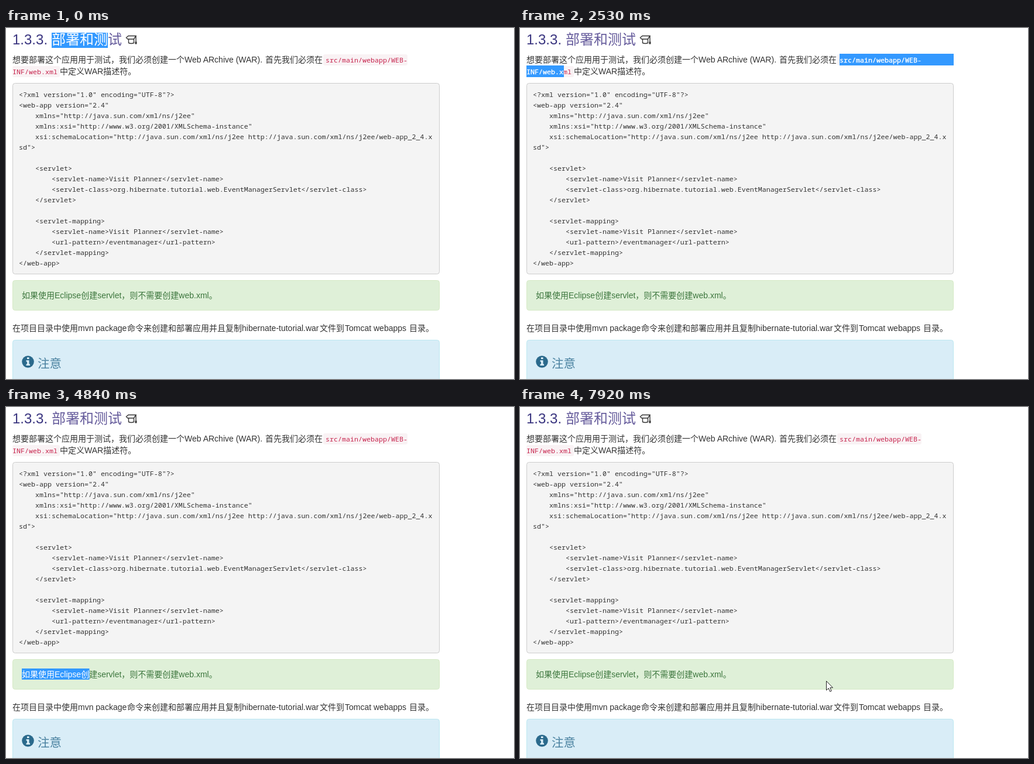
An HTML page for the animation above (8000 ms loop, 868 px wide and 600 px high).

```html
<!DOCTYPE html>
<html lang="zh">
<head>
<meta charset="utf-8">
<title>部署和测试</title>
<style>
html, body { margin: 0; width: 100%; height: 100%; overflow: hidden; background: #fff; }
svg { display: block; }
text { white-space: pre; font-kerning: none; }
.body { font: 14px "Liberation Sans", "Noto Sans CJK SC", "Noto Sans CJK", sans-serif; }
.head { font: 300 24px "Liberation Sans", "Noto Sans CJK SC", "Noto Sans CJK", sans-serif; }
.note { font: 300 20.5px "Noto Sans CJK SC", "Noto Sans CJK", sans-serif; }
.menu { font: 13px "Noto Sans CJK SC", "Noto Sans CJK", sans-serif; }
.code { font: 11.667px "Noto Sans Mono", "Liberation Mono", monospace; }
#picked text { fill: #fff; }
#picked .code { stroke: #fff; stroke-width: .35; }
</style>
</head>
<body>
<svg id="stage" width="868" height="600" viewBox="0 0 868 600">
  <defs><clipPath id="sel"></clipPath></defs>
  <g id="page"></g>
  <g id="picked" clip-path="url(#sel)"></g>
  <g id="menu"></g>
  <path id="arrow" d="M.5 .5V16.2L4.2 12.8L6.7 18.5L9.2 17.4L6.8 11.8H11.5Z" fill="#fff" stroke="#222"/>
</svg>
<script>
const $ = id => document.getElementById(id);
const page = $('page'), picked = $('picked'), menu = $('menu'), arrow = $('arrow'), clip = $('sel');

function add(parent, tag, attrs, text) {
  const el = document.createElementNS('http://www.w3.org/2000/svg', tag);
  for (const k in attrs) el.setAttribute(k, attrs[k]);
  if (text) el.textContent = text;
  parent.appendChild(el);
  return el;
}
const box = (parent, x, y, width, height, fill, stroke, rx = 0) =>
  add(parent, 'rect', { x, y, width, height, fill, stroke: stroke || 'none', rx });
const type = (parent, cls, x, y, fill, str) => add(parent, 'text', { class: cls, x, y, fill }, str);

// Selectable text goes to both the page and the highlighted layer.
function pickable(...args) {
  type(page, ...args);
  type(picked, ...args);
}

// Boxes
box(page, 11.5, 94.5, 729, 326, '#f4f4f4', '#ccc', 4);
box(page, 11.5, 431.5, 729, 51, '#dff0d8', '#d6e9c6', 4);
box(page, 11.5, 533.5, 729, 90, '#d9edf7', '#bce8f1', 4);
box(page, 542, 45, 144, 19, '#f9f2f4', '', 3);
box(page, 11, 65, 81, 19, '#f9f2f4', '', 3);
box(picked, 0, 0, 868, 600, '#3399ff');

// Heading and intro
type(page, 'head', 11, 28, '#3b3680', '1.3.3.');
pickable('head', 78, 28, '#665c9c', '部署和测试');
add(page, 'path', {
  d: 'M205.5 16.5L209 13.5H222L218.5 19H208ZM209.5 19.5V25.5Q214 27.5 218.5 25.5V19M222 14V24',
  fill: 'none', stroke: '#333', 'stroke-width': 1.4
});
box(page, 220.5, 23.5, 3, 4, '#333');
type(page, 'body', 11, 59, '#333', '想要部署这个应用用于测试，我们必须创建一个Web ARchive (WAR).');
type(page, 'body', 443, 59, '#333', '首先我们必须在');
pickable('code', 546, 59, '#c7254e', 'src/main/webapp/WEB-');
pickable('code', 11, 79, '#c7254e', 'INF/web.xml');
type(page, 'body', 92, 79, '#333', '中定义WAR描述符。');

// Listing
`<?xml version="1.0" encoding="UTF-8"?>
<web-app version="2.4"
    xmlns="http://java.sun.com/xml/ns/j2ee"
    xmlns:xsi="http://www.w3.org/2001/XMLSchema-instance"
    xsi:schemaLocation="http://java.sun.com/xml/ns/j2ee http://java.sun.com/xml/ns/j2ee/web-app_2_4.x
sd">

    <servlet>
        <servlet-name>Visit Planner</servlet-name>
        <servlet-class>org.hibernate.tutorial.web.EventManagerServlet</servlet-class>
    </servlet>

    <servlet-mapping>
        <servlet-name>Visit Planner</servlet-name>
        <url-pattern>/eventmanager</url-pattern>
    </servlet-mapping>
</web-app>`.split('\n').forEach((line, i) => {
  const str = line.trimStart();
  if (str) type(page, 'code', 22 + 7 * (line.length - str.length), 118 + 18 * i, '#333', str);
});

// Tip, paragraph and note
pickable('body', 27, 462, '#3c763d', '如果使用Eclipse创建servlet，则不需要创建web.xml。');
type(page, 'body', 11, 518, '#333', '在项目目录中使用mvn package');
type(page, 'body', 207, 518, '#333', '命令来创建和部署应用并且复制hibernate-tutorial.war');
type(page, 'body', 536, 518, '#333', '文件到');
type(page, 'body', 579, 518, '#333', 'Tomcat webapps');
type(page, 'body', 689, 518, '#333', '目录。');
add(page, 'circle', { cx: 37.5, cy: 570.5, r: 10.3, fill: '#2b6a8c' });
add(page, 'path', { d: 'M36 563H39.5V566H36ZM34.5 568H39.5V574.5H41V577H34.5V574.5H36V570.5H34.5Z', fill: '#d9edf7' });
type(page, 'note', 54, 580.5, '#4a82a0', '注意');

// Popup menu
box(menu, .5, .5, 132, 23, '#eee', '#c4c4c4');
box(menu, 55, 1, 1, 22, '#c4c4c4');
type(menu, 'menu', 15, 17, '#333', '复制');
type(menu, 'menu', 62, 17, '#333', '收藏到云盘');

const LOOP = 8000, STEP = 110;
// Share of a stepped change done at t; the first step already moves.
const progress = (t, from, to) => Math.max(0, Math.min(1, (t - from + STEP) / (to - from + STEP)));

// Text drags: rows to sweep, snapped to the glyph size; then a popup until the next click.
const drags = [
  { from: -330, to: 110, off: 550, glyph: 24, power: 2, rows: [[78, 8, 120, 26]], popup: [330, 204, 0] },
  { from: 2200, to: 2640, off: 3190, glyph: 7, power: 2, rows: [[546, 44, 195, 20], [11, 64, 77, 20]], popup: [2860, 90, 39] },
  { from: 4620, to: 5390, off: 6930, glyph: 332 / 23, power: 1, rows: [[27, 447, 332, 19]], popup: [5610, 424, 414] }
];

function swept(d, t) {
  const total = d.rows.reduce((sum, r) => sum + r[2], 0);
  const k = 1 - (1 - progress(t, d.from, d.to)) ** d.power;
  let left = k === 1 ? total : Math.floor(k * total / d.glyph) * d.glyph;
  return d.rows.map(([x, y, w, h]) => {
    const part = Math.min(w, left);
    left -= part;
    return [x, y, part, h];
  });
}

// Pointer legs: from, to, end point, and how far the path bows vertically.
const shows = [[330, 1980], [3190, 4620], [5500, LOOP]];
const legs = [
  [330, 770, 325, 90, 0], [1100, 1760, 550, 62, -28],
  [3190, 3630, 518, 105, 0], [3740, 4510, 28, 449, 0],
  [5500, 5720, 423, 449, 0], [5830, 6160, 500, 472, 0],
  [6930, 7370, 565, 470, 0], [7590, 7700, 564, 468, 0], [7920, 7920, 523, 468, 0]
];

function pointer(t) {
  if (!shows.some(([a, b]) => t >= a && t < b)) return null;
  let x = 204, y = 36;
  for (const [from, to, ex, ey, bow] of legs) {
    const k = progress(t, from, to);
    if (t < from) break;
    // The pointer is hidden while it drags, so it resumes beside the marked text.
    if (from === shows[1][0]) [x, y] = [90, 74];
    if (from === shows[2][0]) [x, y] = [361, 456];
    x += (ex - x) * k;
    y += (ey - y) * k + bow * Math.sin(Math.PI * k);
  }
  return [Math.round(x), Math.round(y)];
}

function place(el, pos) {
  el.style.display = pos ? '' : 'none';
  if (pos) el.setAttribute('transform', `translate(${pos})`);
}

let shown = -1;
function draw(now) {
  const t = Math.floor((now % LOOP) / STEP) * STEP;
  if (t === shown) return;
  shown = t;
  const drag = drags.find(d => t >= d.from && t < d.off);
  clip.replaceChildren();
  if (drag) for (const row of swept(drag, t)) box(clip, ...row, '#000');
  place(menu, drag && t >= drag.popup[0] && drag.popup.slice(1));
  place(arrow, pointer(t));
}

const start = performance.now();
function tick() {
  draw(performance.now() - start);
  requestAnimationFrame(tick);
}
tick();
</script>
</body>
</html>
```
